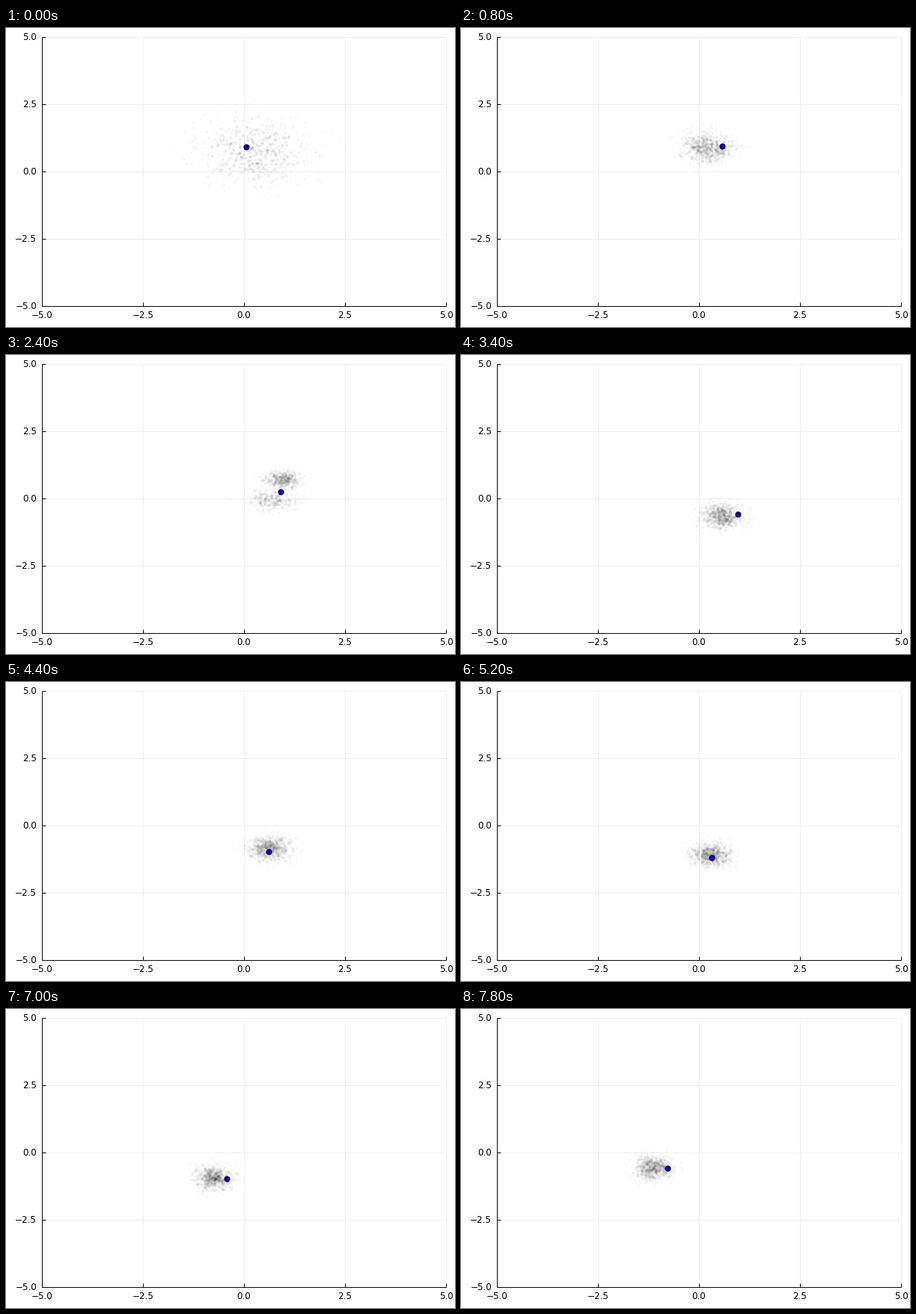
Recreate the animation shown at these times as a matplotlib script. Size 600 px wide and 400 px high, loop 8000 ms.

```python
import numpy as np
import matplotlib.pyplot as plt
from matplotlib.animation import FuncAnimation

W, H, DPI = 600, 400, 100
FRAMES, STEP_MS = 40, 200
PX = 72 / DPI
HAIR = .97 * PX
LEFT, TOP, DX, DY = 48, 12, 135, 90
COUNT = 640
OPACITY = .066

# frame, tracked point x, y, cloud centre x, y (stage pixels)
PATH = np.array([
    (0, 321, 159, 331, 165),
    (4, 349, 157.5, 328, 160),
    (12, 367, 183, 363, 180),
    (17, 370, 213, 348, 216),
    (22, 351, 227, 353, 223),
    (31, 313.5, 238, 299, 236),
    (39, 275.5, 212.5, 257, 212),
])


def hermite(keys, n):
    """Smooth curve through the key points."""
    t, p = keys[:, 0], keys[:, 1:]
    m = np.gradient(p, t, axis=0)
    i = min(np.searchsorted(t, n, side="right") - 1, len(t) - 2)
    h = t[i + 1] - t[i]
    u = (n - t[i]) / h
    return ((1 + 2 * u) * (1 - u) ** 2 * p[i] + u * (1 - u) ** 2 * h * m[i]
            + u * u * (3 - 2 * u) * p[i + 1] + u * u * (u - 1) * h * m[i + 1])


def walk(seed):
    """Unit cloud that is resampled and jittered at every step."""
    rng = np.random.default_rng(seed)
    z = rng.normal(size=(COUNT, 2))
    steps = []
    for _ in range(FRAMES):
        steps.append((z, rng.uniform(.4, 1.4, COUNT)))
        z = .917 * (z - z.mean(axis=0))[rng.integers(COUNT, size=COUNT)]
        z = z + .4 * rng.normal(size=(COUNT, 2))
    return steps


STEPS = walk(3)
LOOSE = np.arange(COUNT) % 5 < 2


def cloud(n, centre):
    z, weight = STEPS[n]
    spread = 14 + 7 * np.exp(-n / 8) + 18 * np.exp(-n)
    # the cloud parts into two bands for a moment
    split = np.exp(-((n - 12) / 2.5) ** 2)
    scale = spread * np.where(LOOSE, 1.3, 1)
    shift = split * np.where(LOOSE, 1, -1)
    x = centre[0] + scale * z[:, 0] + 7 * -shift
    y = centre[1] + scale * (.6 - .15 * split) * z[:, 1] + 13 * shift
    alpha = OPACITY * weight * np.exp(-.25 * (z ** 2).sum(axis=1))
    return np.column_stack([x, y]), alpha


plt.rcParams["font.family"] = "DejaVu Sans"
fig = plt.figure(figsize=(W / DPI, H / DPI), dpi=DPI, facecolor="white")
ax = fig.add_axes([0, 0, 1, 1])
ax.set(xlim=(0, W), ylim=(H, 0))
ax.axis("off")


def line(xs, ys, color="black", z=3):
    ax.plot(xs, ys, color=color, lw=HAIR, zorder=z, solid_capstyle="butt")


def label(value, x, y, side):
    text = f"{value:.1f}".replace("-", "\u2212")
    ax.text(x, y, text, fontsize=12 * PX, ha=side, va="baseline")


right, bottom = LEFT + 4 * DX, TOP + 4 * DY
for k in range(5):
    x, y = LEFT + k * DX, TOP + k * DY
    line([x, x], [TOP, bottom], "#eeeeee", 1)
    line([LEFT, right], [y, y], "#eeeeee", 1)
    line([x, x], [bottom, bottom - 5])
    line([LEFT, LEFT + 5], [y, y])
    label(2.5 * k - 5, x, 387.5, "center")
    label(5 - 2.5 * k, 41, y + 4.3, "right")
line([LEFT, LEFT], [TOP, bottom])
line([LEFT, right], [bottom, bottom])

dust = ax.scatter([], [], s=7, linewidths=0, zorder=2)
dot, = ax.plot([], [], "o", ms=7 * PX, mfc="blue", mec="black",
               mew=PX, zorder=4, snap=False)


def draw(n):
    pose = hermite(PATH, n)
    points, alpha = cloud(n, pose[2:])
    rgba = np.zeros((COUNT, 4))
    rgba[:, 3] = alpha
    dust.set_offsets(points)
    dust.set_facecolors(rgba)
    dot.set_data(pose[:1], pose[1:2])
    return dust, dot


anim = FuncAnimation(fig, draw, frames=FRAMES, interval=STEP_MS,
                     repeat=True, repeat_delay=0)
plt.show()
```
